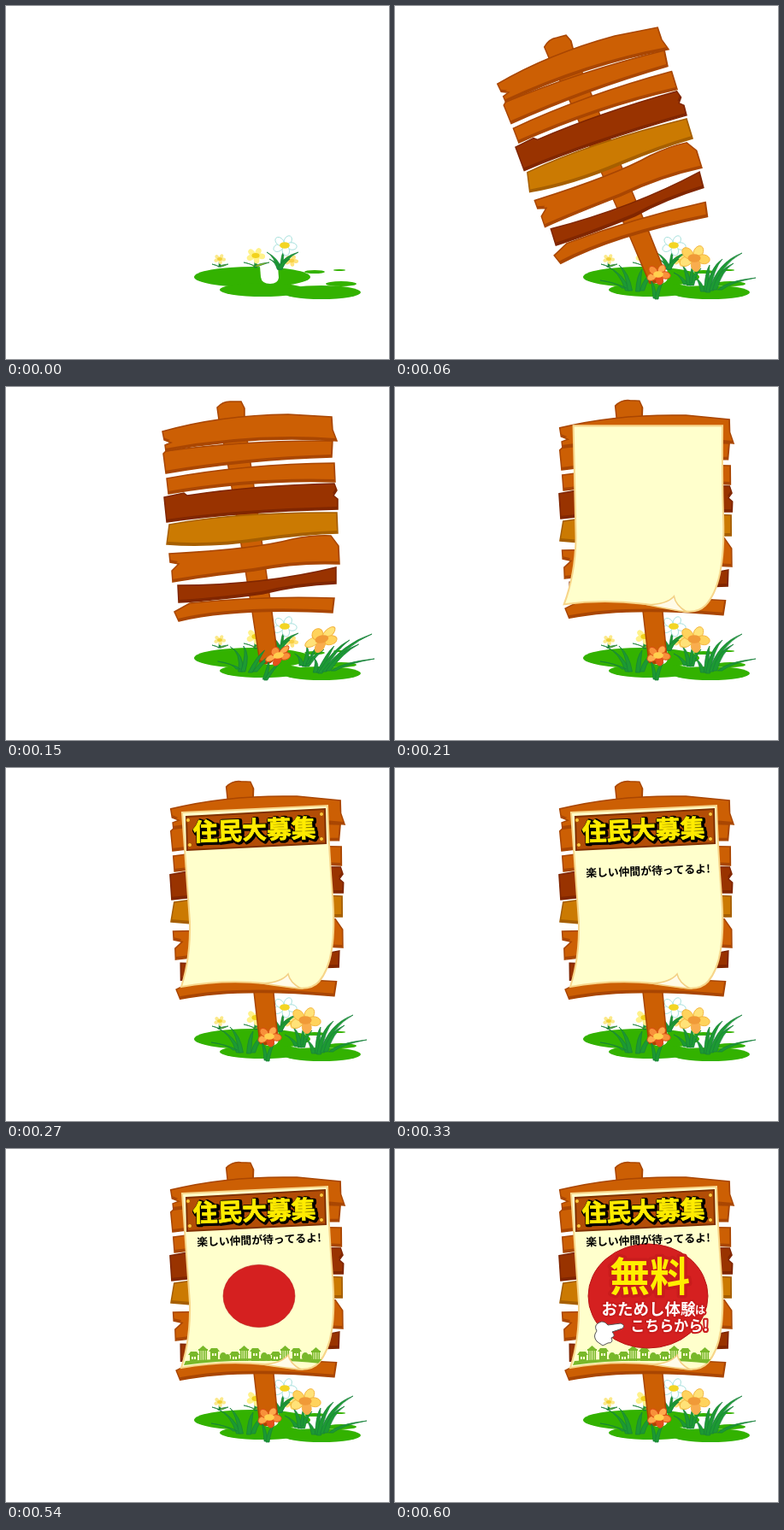
These frames come from a looping animation (448 by 413 pixels, 630 ms). An HTML page with a canvas:

```html
<!DOCTYPE html>
<html lang="ja">
<meta charset="utf-8">
<style>
html, body { margin: 0; height: 100%; overflow: hidden; background: #fff }
canvas { display: block }
</style>
<canvas id="stage" width="448" height="413"></canvas>
<script>
const c = document.getElementById('stage').getContext('2d');
const STEP = 30, LOOP = 630, TAU = Math.PI * 2;
const FONT = '"Noto Sans CJK JP", "Noto Sans CJK", sans-serif';

const WOOD = ['#cc5f04', '#a94602'], DARK = ['#993300', '#802600'], OCHRE = ['#cb7a02', '#a65f00'];
const post = new Path2D('M247 24Q254 16 264 17L275 17L279 25L279 40L311 263L317 310Q312 328 297 322L288 263L260 93L249 38Z');
const planks = [
  ['M187 75Q280 62 382 63L381 82Q280 85 187 101L184 78Z', WOOD],
  ['M183 52Q250 33 330 32L381 35L382 50L387 63Q290 56 187 75L186 68L193 65L185 62Z', WOOD],
  ['M188 107Q280 90 384 89L385 111Q290 108 190 125Z', WOOD],
  ['M185 129L208 124L212 127Q290 115 384 113L387 121L383 127L388 131L388 143Q270 146 188 158Z', DARK],
  ['M191 161Q270 146 387 147L388 171Q350 172 300 179Q240 188 188 184Z', OCHRE],
  ['M191 195Q290 190 335 178Q360 173 380 174L389 186L390 207Q340 205 290 215Q230 222 195 228L194 215L202 207L192 205Z', WOOD],
  ['M201 232Q300 232 386 211L386 230Q340 232 300 242Q240 250 202 252Z', DARK],
  ['M197 263L215 253Q300 244 384 247L382 264Q270 258 202 274Z', WOOD]
].map(([d, tone]) => [new Path2D(d), tone]);
const sheet = new Path2D('M206 52L376 44Q378 100 382 150Q388 225 366 250Q357 260 338 257Q270 244 205 256Q216 222 215 180Q210 110 206 52Z');
const curl = new Path2D('M300 252Q322 251 330 241Q332 251 345 258Q325 256 300 252Z');
const hand = new Path2D('M236 213Q232 206 239 203Q244 200 249 206L264 204Q270 206 266 210L254 214Q259 219 253 221Q256 227 249 227L243 230L236 225Q231 219 236 213Z');

function pose(x, y, turn, scale, draw) {
  c.save();
  c.translate(x, y);
  c.rotate(turn * Math.PI / 180);
  c.scale(scale, scale);
  c.translate(-x, -y);
  draw();
  c.restore();
}

function paint(path, fill, stroke, width = 1) {
  c.fillStyle = fill;
  c.fill(path);
  if (stroke) {
    c.strokeStyle = stroke;
    c.lineWidth = width;
    c.stroke(path);
  }
}

function oval(x, y, rx, ry, fill, stroke, turn = 0) {
  const path = new Path2D();
  path.ellipse(x, y, rx, ry, turn, 0, TAU);
  paint(path, fill, stroke);
}

function timber(path, [face, edge]) {
  c.save();
  c.clip(path);
  paint(path, edge);
  c.translate(-1, -3);
  paint(path, face);
  c.restore();
  c.strokeStyle = edge;
  c.lineWidth = 1.5;
  c.stroke(path);
}

function label(text, x, y, size, fill, outline, width, weight = 900) {
  c.font = `${weight} ${size}px ${FONT}`;
  c.textAlign = 'center';
  c.textBaseline = 'alphabetic';
  c.lineJoin = 'round';
  if (outline) {
    c.strokeStyle = outline;
    c.lineWidth = width;
    c.strokeText(text, x, y);
  }
  c.fillStyle = fill;
  c.fillText(text, x, y);
}

function flower(x, y, r, petals, heart, edge) {
  for (let i = 0; i < 5; i++) {
    const a = i / 5 * TAU - 1.1;
    oval(x + Math.cos(a) * r * .6, y + Math.sin(a) * r * .45, r * .42, r * .3, petals[i % petals.length], edge, a);
  }
  oval(x, y, r * .42, r * .27, heart);
}

function blade(x, y, tipX, tipY, width = 5, fill = '#1d9a33') {
  const bendX = x + (tipX - x) * .25, bendY = y + (tipY - y) * .75;
  paint(new Path2D(`M${x - width / 2} ${y}Q${bendX - width / 2} ${bendY} ${tipX} ${tipY}Q${bendX + width / 2} ${bendY + 2} ${x + width / 2} ${y}Z`), fill, '#17803b', .7);
}

function meadow() {
  const green = '#33b200';
  [[288, 317, 68, 12], [300, 332, 50, 8], [369, 335, 46, 8], [361, 311, 12, 2], [392, 325, 18, 3], [390, 309, 7, 1]]
    .forEach(e => oval(...e, green));
  paint(new Path2D('M297 304L318 304L319 318Q318 325 309 325Q299 325 298 317Z'), '#fff');
  blade(250, 304, 250, 297, 2);
  [[241, 302], [260, 302]].forEach(p => blade(250, 305, ...p, 3, '#6bab28'));
  flower(250, 296, 7, ['#fbe98b'], '#f1cf35');
  blade(292, 306, 293, 293, 3);
  [[278, 300], [308, 300]].forEach(p => blade(292, 305, ...p, 4, '#a6be18'));
  flower(292, 292, 11, ['#fff28a'], '#f2d21c');
  flower(334, 298, 8, ['#ffe37a'], '#f7cf45');
  blade(322, 308, 326, 284, 3);
  [[305, 288], [342, 288], [308, 296], [332, 296]].forEach(p => blade(320, 308, ...p));
  flower(326, 280, 14, ['#fff'], '#f3d524', '#a6e0dc');
}

// Front plants lean sideways from their roots.
function plants(lean, nod) {
  c.save();
  c.transform(1, 0, -lean, 1, lean * 338, 0);
  [[272, 333, 247, 304], [275, 333, 262, 303], [268, 330, 240, 321], [284, 334, 289, 308], [289, 333, 307, 309],
   [344, 327, 336, 303], [340, 326, 326, 312], [347, 327, 358, 307],
   [360, 334, 351, 317], [364, 334, 368, 303], [366, 335, 383, 296],
   [370, 333, 406, 289], [374, 332, 396, 301], [380, 332, 422, 318]].forEach(b => blade(...b));
  blade(346, 324, 350, 300, 3);
  flower(350, 295, 18, ['#ffe278', '#ffd35c', '#f9ad4e'], '#f09a38', '#f3b43f');
  [[304, 342, 299, 320], [306, 343, 314, 322]].forEach(b => blade(...b, 4));
  pose(308, 330, nod, 1, () => flower(308, 314, 14, ['#ffab4d', '#f8913a', '#e6501b'], '#ffd04f', '#dc4f16'));
  c.restore();
}

function board() {
  timber(post, WOOD);
  planks.forEach(p => timber(...p));
}

function town(drop) {
  c.save();
  c.clip(sheet);
  c.translate(0, drop);
  c.fillStyle = '#78b82a';
  c.fill(new Path2D('M210 248Q270 243 370 246L368 251Q330 247 300 248Q250 247 208 253Z'));
  for (let i = 0; i < 13; i++) {
    const x = 214 + i * 12, h = 7 + i * 5 % 4 * 2, base = 248;
    if (i % 4 == 1 || i == 12) {
      for (let k = 0; k < 4; k++) c.fillRect(x + k * 2.5, base - h - 5, 1.6, h + 5);
      c.fillRect(x - 1, base - h - 5, 11, 2);
      c.fill(new Path2D(`M${x} ${base - h - 5}l4.5 -4l4.5 4Z`));
    } else if (i % 4 == 3) {
      oval(x + 4, base - 5, 4, 5, '#78b82a');
      oval(x + 9, base - 4, 3, 4, '#78b82a');
    } else {
      c.fillRect(x + 1, base - h, 9, h);
      c.fill(new Path2D(`M${x - 1} ${base - h}l3 -4h7l3 4Z`));
      c.fillStyle = '#ffffcc';
      c.fillRect(x + 3, base - h + 2, 2, 3);
      c.fillRect(x + 6, base - h + 2, 2, 3);
      c.fillStyle = '#78b82a';
    }
  }
  c.restore();
}

function title() {
  paint(new Path2D('M211 57L373 48L374 88L212 96Z'), '#b34d06', '#803000', 2);
  [[213, 61], [369, 54], [215, 90], [369, 83]].forEach(([x, y]) => oval(x, y, 2.5, 2.5, '#ffc83c', '#a34a00'));
  pose(291, 72, -2, 1, () => {
    label('住民大募集', 292, 84, 28.8, '#000', '#000', 5);
    label('住民大募集', 290.5, 83, 28.8, '#ffec00', '#ffec00', .8);
  });
}

function offer(scale, withText) {
  const red = '#c91c1c';
  pose(296, 172, 0, scale, () => {
    oval(296, 172, 70, 61, '#d52020', '#b51616');
    if (!withText) return;
    label('無料', 298, 166, 47, '#ffee00', red, 7);
    label('おためし体験', 297, 194, 18.5, '#fff', red, 4);
    label('は', 357, 193, 12, '#fff', red, 4);
    label('こちらから!', 321, 213, 17, '#fff', red, 4);
    paint(hand, '#fff', '#555');
  });
}

// Value for a step: before the list nothing, after it the last entry.
const pick = (step, start, list) => step < start ? null : list[Math.min(step - start, list.length - 1)];

function draw(step) {
  c.clearRect(0, 0, 448, 413);
  meadow();
  if (step < 1) return;

  pose(305, 320, pick(step, 1, [-46, -14.5, -4, 4, 0, 1, 2.05]), 1, board);

  const paper = pick(step, 6, [[6, 1.12], [2.7, 1.025], [0, 1]]);
  if (paper) pose(295, 150, ...paper, () => {
    paint(sheet, '#ffffcc', '#f7d58a', 2);
    const drop = pick(step, 13, [14, 7, 0]);
    if (drop != null) town(drop);
    paint(curl, '#fffbe8', '#f3d084', 1.5);
  });

  const pop = pick(step, 18, [.6, 1.25, 1]);
  if (pop) offer(pop, step > 18);

  const titleScale = pick(step, 8, [1.2, 1]);
  if (titleScale) pose(292, 72, 0, titleScale, title);

  const slide = pick(step, 10, [28, 14, 6, 0]);
  if (slide != null) pose(296, 106 + slide, -2, 1, () =>
    label('楽しい仲間が待ってるよ!', 296, 111 + slide, 12.8, '#000'));

  plants(pick(step, 1, [-.3, 0, .4, .7, .45, .2, 0]), pick(step, 18, [0, 6, 3]) || 0);
}

function tick() {
  draw(Math.floor(performance.now() % LOOP / STEP));
  requestAnimationFrame(tick);
}
tick();
</script>
</html>
```
